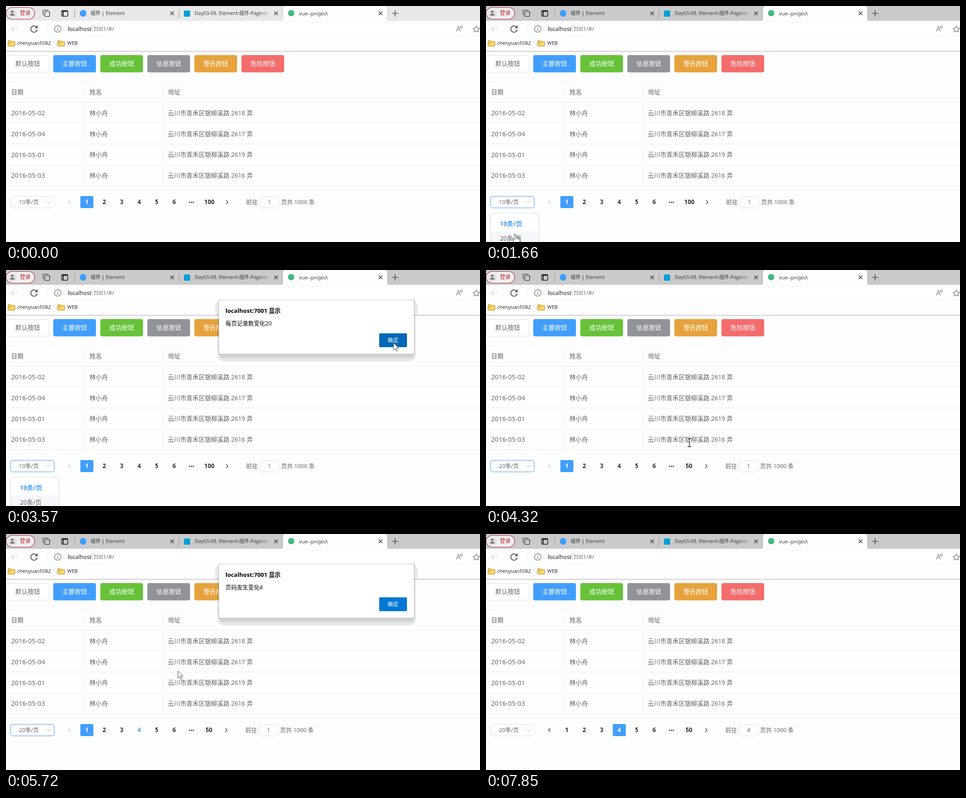
Recreate the animation shown at these times as an HTML page. Size 1058 px wide and 529 px high, loop 8.41 s.

```html
<!DOCTYPE html>
<html lang="zh-CN">
<head>
<meta charset="utf-8">
<title>Pagination demo</title>
<style>
html, body { margin: 0; width: 100%; height: 100%; overflow: hidden; background: #fefefe; }
svg { display: block; width: 100vw; height: 100vh; }
text { font-family: "Open Sans", "Noto Sans CJK SC", "Noto Sans CJK", sans-serif; white-space: pre; }
</style>
</head>
<body>
<svg id="stage" viewBox="0 0 1058 529"></svg>
<script>
const LOOP = 8410;
const BLUE = '#409eff', TEXT = '#606266', EDGE = '#dcdfe6', GRID = '#ebeef5';
const BODY = 13.75;

// markup helpers; text is placed by the middle of its line
const text = (x, cy, str, size, fill, o = {}) =>
  `<text x="${x}" y="${cy + size * 0.36}" font-size="${size}" fill="${fill}"` +
  `${o.bold ? ' font-weight="700"' : ''}${o.mid ? ' text-anchor="middle"' : ''}` +
  `${o.id ? ` id="${o.id}"` : ''}>${str}</text>`;
const rect = (x, y, w, h, fill, extra = '') =>
  `<rect x="${x}" y="${y}" width="${w}" height="${h}" fill="${fill}" ${extra}/>`;
const line = (d, color, width = 1, extra = '') =>
  `<path d="${d}" fill="none" stroke="${color}" stroke-width="${width}" ${extra}/>`;
const dot = (x, y, r, fill, extra = '') => `<circle cx="${x}" cy="${y}" r="${r}" fill="${fill}" ${extra}/>`;
const group = (id, body, extra = '') => `<g id="${id}" ${extra}>${body}</g>`;

const cross = x => line(`M${x - 4} 12.5l8 8m0-8l-8 8`, '#222', 1.1);
const folder = x =>
  `<path d="M${x + .5} 79q0-1.500 1.500-1.500h4l2 2h6.500q1.500 0 1.500 1.500v7.500q0 1.500-1.500 1.500h-12.500q-1.500 0-1.500-1.500z" fill="#ffd766" stroke="#a88317"/>` +
  line(`M${x + 1} 82.500h5l2-2.500`, '#a88317');

function browser() {
  return rect(0, 0, 1058, 34, '#e8e8e8', 'id="strip"') +
    rect(0, 33, 1058, 68, '#fdfdfd') +
    // profile pill
    rect(.5, 3.5, 63.5, 26, '#efefef', 'rx="13" stroke="#b3282e" stroke-width="1.200"') +
    dot(14, 16, 9, '#dedede') + dot(14, 13, 2.8, '#777') +
    '<path d="M9 21.500q0-4.500 5-4.500t5 4.500z" fill="#777"/>' +
    text(31, 16, '登录', 12, '#b3282e') +
    // window icons
    line('M84.500 20q-2-.5-2-2.500v-5.500q0-3 3-3h6q2 0 2.500 1.500', '#222', 1.2) +
    rect(86.5, 12, 11, 11.5, 'none', 'rx="2.500" stroke="#222" stroke-width="1.200"') +
    rect(124.2, 10.2, 13.6, 12.8, 'none', 'rx="2" stroke="#222" stroke-width="1.500"') +
    line('M125 12h12M127.500 13v10', '#222', 2.2) +
    line('M153.500 8v18M386.500 8v18', '#8b8b8b') +
    // tabs
    dot(172, 16.5, 7.5, BLUE) + text(189, 16.5, '组件 | Element', 11, '#333') + cross(371) +
    rect(397, 10, 14, 14, '#00a1d6', 'rx="2"') +
    text(421, 16.5, 'Day03-09. Element-组件-Paginat', 11, 'url(#fade)') + cross(603) +
    '<path d="M612 34q6 0 6-6V6q0-6 6-6h221q6 0 6 6v22q0 6 6 6z" fill="#fdfdfd" filter="url(#soft)"/>' +
    rect(610, 33, 250, 5, '#fdfdfd') +
    dot(636.5, 16, 7, '#41b883') + text(654, 16.5, 'vue--project', 11.5, '#333') + cross(836) +
    line('M861.500 16.500h14m-7-7v14', '#222', 1.2) +
    // address row
    rect(90.5, 36.5, 1000, 30, '#fff', 'rx="15" stroke="#f1f1f1"') +
    line('M27 51.500H12.500m6-6l-6 6l6 6', '#cfcfcf', 1.2) +
    line('M68.800 48.300a7.100 7.100 0 1 0 .8 4M69.500 44.300v4.500h-4.500', '#222', 1.4) +
    dot(115.5, 51.5, 7.3, 'none', 'stroke="#555" stroke-width="1.100"') +
    line('M115.500 50.500v5', '#444', 1.3) + dot(115.5, 48, .9, '#444') +
    text(137.5, 51.5, 'localhost<tspan fill="#666">:7001/#/</tspan>', 12.8, '#111') +
    line('M1005.500 57l4-11.500h.8l4 11.500m-7.300-4h6M1013.500 45.500q2 2 1 4.500M1016 43.500q3.500 3.500 1.500 8', '#666', 1.1) +
    line('M1050 44.500l2.200 4.700 5.100.6-3.800 3.500 1 5-4.500-2.500-4.500 2.500 1-5-3.800-3.500 5.100-.6z', '#666', 1.1) +
    // bookmarks
    folder(4) + text(25, 83.5, 'chenyuan5082', 11, '#222') +
    folder(115) + text(136.5, 83.5, 'WEB', 11, '#222') +
    rect(0, 101, 1058, 1, '#a6a6a6');
}

function content() {
  const buttons = [['默认', '#fff'], ['主要', BLUE], ['成功', '#67c23a'],
    ['信息', '#909399'], ['警告', '#e6a23c'], ['危险', '#f56c6c']];
  let out = buttons.map(([name, fill], i) =>
    (i ? rect(.5 + 105 * i, 110, 95.3, 38.7, fill, 'rx="4"')
      : rect(.5, 110.5, 95, 38, fill, `rx="3.500" stroke="${EDGE}"`)) +
    text(48.2 + 105 * i, 129.3, name + '按钮', BODY, i ? '#fff' : TEXT, { mid: 1 })).join('');

  for (let i = 0; i < 6; i++) out += rect(1, 169 + Math.round(46.65 * i), 1057, 1, GRID);
  for (const x of [1, 176, 351]) out += rect(x - .5, 169, 1, 234, GRID);
  ['日期', '姓名', '地址'].forEach((s, i) =>
    out += text(11.4 + 175 * i, 193.5, s, BODY, '#909399', { bold: 1 }));
  [[2, 8], [4, 7], [1, 9], [3, 6]].forEach(([day, no], i) => {
    const y = 240.2 + 46.65 * i;
    out += text(11.2, y, '2016-05-0' + day, 14.6, TEXT) + text(186.2, y, '林小舟', BODY, TEXT) +
      text(361.2, y, `云川市青禾区银柳溪路 261${no} 弄`, BODY, TEXT);
  });
  return out;
}

function pager() {
  let out = rect(10.5, 426.5, 97, 26, '#fff', 'id="select" rx="3.500"') +
    text(51, 439.7, '10条/页', 12.5, TEXT, { mid: 1, id: 'size' }) +
    line('M-4-2l4 4l4-4', '#c0c4cc', 1.1, 'id="chevron"') +
    line('M143.500 435.500l-4 4l4 4', '#c0c4cc', 1.3, 'id="prev"') +
    rect(0, 426, 29, 27, BLUE, 'id="active" rx="2"');
  for (let n = 1; n < 7; n++)
    out += text(141.2 + 39 * n, 439.5, n, 13.3, '#303133', { mid: 1, bold: 1, id: 'page' + n });
  for (const x of [409.5, 413.7, 417.9]) out += dot(x, 440, 1.5, '#303133');
  return out + text(454, 439.5, '100', 13.3, '#303133', { mid: 1, bold: 1, id: 'last' }) +
    group('jump', line('M491.500 435.500l4 4l-4 4', '#303133', 1.3) +
      text(536, 439.5, '前往', 12.9, TEXT) +
      rect(566.5, 426.5, 43, 26, '#fff', `rx="3.500" stroke="${EDGE}"`) +
      text(588, 439.7, '1', 12.9, TEXT, { mid: 1, id: 'goto' }) +
      text(614, 439.5, '页共 1000 条', 12.9, TEXT));
}

function popup() {
  return group('drop',
    rect(10.5, 464.5, 106.5, 110, '#fff', 'rx="4" filter="url(#soft)"') +
    rect(10.5, 464.5, 106.5, 110, '#fff', 'rx="4" stroke="#e4e7ed"') +
    '<path d="M45 465l6-5l6 5z" fill="#fff" stroke="#ebeef5"/>' + rect(45.5, 465, 11, 1.5, '#fff') +
    rect(11, 504.5, 105.5, 33, '#f5f7fa', 'id="hover"') +
    text(31, 488.3, '10条/页', 14, BLUE, { bold: 1 }) +
    text(31, 521, '20条/页', BODY, TEXT));
}

function dialog() {
  return `<g clip-path="url(#below)">` + group('dialog',
    '<path d="M475 67Q468 72 467 86V101H471V190Q473 204 487 205H900Q913 204 915 190V101H919V86Q918 72 911 67Z" fill-opacity=".085"/>' +
    rect(476, 110, 434, 87.5, '#000', 'rx="8" fill-opacity=".090"') +
    rect(475, 67, 436, 121.5, '#fff', 'rx="4" stroke="#000" stroke-opacity=".250"') +
    text(490, 91.5, 'localhost:7001 显示', 13.1, '#000', { bold: 1 }) +
    text(490, 119, '', 12.65, '#000', { id: 'message' }) +
    rect(833, 142, 62, 31, '#0078d4', 'id="ok" rx="2"') +
    text(864, 157.5, '确定', 12.3, '#fff', { mid: 1 })) + '</g>';
}

function cursors() {
  const skin = 'fill="#fff" stroke="#333" stroke-width=".9" stroke-linejoin="round"';
  const beam = 'M-4-9h2.500q1.500 0 1.500 1.500q0-1.500 1.500-1.500h2.500M0-8V8M-4 9h2.500q1.500 0 1.500-1.500q0 1.500 1.500 1.500h2.500';
  return group('cursor',
    `<path id="a" ${skin} d="M0 0V16l3.700-3.600 2.600 6.100 2.400-1-2.600-6H11.500z"/>` +
    group('h', `<path ${skin} d="M-2 13.500V2a2 2 0 0 1 4 0V8.200a1.800 1.800 0 0 1 3.300.8a1.800 1.800 0 0 1 3 1a1.600 1.600 0 0 1 2.200 1.800V17q-.3 2-1.700 4v2H-1v-2L-5.500 13.500q-1.200-2.300.3-2.900q1.300-.4 2.200 1.100z"/>` +
      line('M2 8v4.500M5.300 9v3.500M8.300 10v2.500', '#333', .9)) +
    group('i', line(beam, '#fff', 3) + line(beam, '#111', 1.3)));
}

document.getElementById('stage').innerHTML = `<defs>
  <linearGradient id="fade" gradientUnits="userSpaceOnUse" x1="568" y1="0" x2="590" y2="0">
    <stop offset="0" stop-color="#333"/><stop offset="1" stop-color="#333" stop-opacity="0"/></linearGradient>
  <filter id="soft" x="-20%" y="-20%" width="140%" height="140%">
    <feDropShadow dx="0" dy="1" stdDeviation="2.500" flood-color="#000" flood-opacity=".16"/></filter>
  <clipPath id="below"><rect x="0" y="66.500" width="1058" height="463"/></clipPath></defs>` +
  rect(0, 0, 1058, 529, '#fefefe') + browser() + content() + pager() + popup() + dialog() + cursors();

const el = {};
for (const node of document.querySelectorAll('[id]')) el[node.id] = node;
const set = (id, name, value) => el[id].setAttribute(name, value);
const show = (id, on) => set(id, 'visibility', on ? 'visible' : 'hidden');
const say = (id, value) => { if (el[id].textContent !== value) el[id].textContent = value; };

// bursts of movement: start, end, steps
const BURSTS = [[380, 760, 5], [910, 1740, 11], [1840, 2640, 10], [2720, 2900, 3], [3280, 4070, 10],
  [4130, 4930, 11], [5010, 5010, 1], [5200, 5380, 3], [5630, 5900, 4], [6090, 6200, 2],
  [6380, 7180, 10], [7280, 7850, 8]];

// pointer: time, x, y, shape (arrow, hand, i-beam)
const PATH = [[380, 337, 514, 'a'], [475, 262, 496, 'a'], [570, 175, 470, 'a'], [665, 95, 446, 'h'],
  [760, 62, 438, 'h'], [1240, 62, 438, 'h'], [1400, 63, 470, 'h'], [1650, 65, 511, 'h'],
  [2018, 65, 511, 'h'], [2100, 80, 500, 'a'], [2370, 330, 380, 'a'], [2640, 680, 244, 'a'],
  [2810, 815, 188, 'a'], [2900, 846, 179, 'a'], [3280, 852, 172, 'a'], [3450, 865, 163.5, 'a'],
  [3980, 865, 163.5, 'a'], [4130, 760, 235, 'a'], [4285, 454, 387, 'i'], [4330, 454, 387, 'i'],
  [4365, 400, 408, 'a'], [4600, 294, 440, 'h'], [4850, 286, 438, 'h'], [4930, 286, 438, 'h'],
  [5010, 289, 438, 'h'], [5540, 289, 438, 'h'], [5630, 312, 410, 'a'], [5900, 527, 101, 'a'],
  [6200, 520, 104, 'a'], [6380, 545, 108, 'a'], [6730, 898.5, 171, 'a'], [6830, 898.5, 171, 'a'],
  [7000, 868, 160, 'a'], [7180, 868, 160, 'a'], [7450, 800, 330, 'a'], [7780, 700, 530, 'a'], [7850, 700, 540, 'a']];

const ramp = (t, start, length) => Math.min(1, Math.max(0, (t - start) / length));
const settle = p => 1 - (1 - p) ** 3;

function snap(t) {
  let s = 0;
  for (const [from, to, steps] of BURSTS) {
    if (t < from) break;
    if (t >= to) { s = to; continue; }
    const d = (to - from) / (steps - 1);
    s = from + Math.floor((t - from) / d) * d;
  }
  return s;
}

function pointer(t) {
  const k = PATH.findIndex(p => p[0] > t);
  if (k < 1) return null;
  const [t0, x0, y0, shape] = PATH[k - 1], [t1, x1, y1] = PATH[k];
  const p = (t - t0) / (t1 - t0);
  return { x: x0 + (x1 - x0) * p, y: y0 + (y1 - y0) * p, shape };
}

function draw(time) {
  const t = snap(time);
  const focused = t >= 910, twenty = t >= 3980, moved = t >= 7180;
  const page = moved ? 4 : 1;
  set('strip', 'fill', focused ? '#cacaca' : '#e8e8e8');

  const inSelect = t >= 665 && t < 910;
  set('select', 'stroke', focused && !moved ? BLUE : inSelect ? '#c0c4cc' : EDGE);
  say('size', twenty ? '20条/页' : '10条/页');
  const turn = settle(ramp(t, 880, 300)) - settle(ramp(t, 3830, 300));
  set('chevron', 'transform', `translate(95.5 439.5) rotate(${-180 * turn})`);

  set('prev', 'stroke', moved ? '#303133' : '#c0c4cc');
  set('active', 'x', Math.round(126.5 + 39 * page));
  for (let n = 1; n < 7; n++)
    set('page' + n, 'fill', n === page ? '#fff' : n === 4 && t >= 4600 ? BLUE : '#303133');
  say('last', twenty ? '50' : '100');
  set('last', 'x', twenty ? 453 : 454);
  set('jump', 'transform', `translate(${twenty ? -2 : 0} 0)`);
  say('goto', String(page));

  const open = settle(ramp(t, 880, 300)) - settle(ramp(t, 3800, 260));
  show('drop', open > .01);
  set('drop', 'opacity', open);
  set('drop', 'transform', `translate(0 460) scale(1 ${open}) translate(0 -460)`);
  set('hover', 'y', t < 1480 ? 471.5 : 504.5);

  const alert = ramp(t, 1820, 140) - ramp(t, 3820, 280) + ramp(t, 5180, 140) - ramp(t, 7130, 270);
  show('dialog', alert > .01);
  set('dialog', 'opacity', alert);
  set('dialog', 'transform', `translate(0 ${-18 * (1 - alert)})`);
  say('message', t < 5000 ? '每页记录数变化20' : '页码发生变化4');

  const c = pointer(t);
  for (const shape of ['a', 'h', 'i']) show(shape, c && c.shape === shape);
  if (c) set('cursor', 'transform', `translate(${c.x} ${c.y})`);
  const overOk = c && c.x > 833 && c.x < 895 && c.y > 142 && c.y < 173;
  set('ok', 'fill', overOk ? '#0067b8' : '#0078d4');
}

const start = performance.now();
function tick() {
  draw((performance.now() - start) % LOOP);
  requestAnimationFrame(tick);
}
tick();
</script>
</body>
</html>
```
